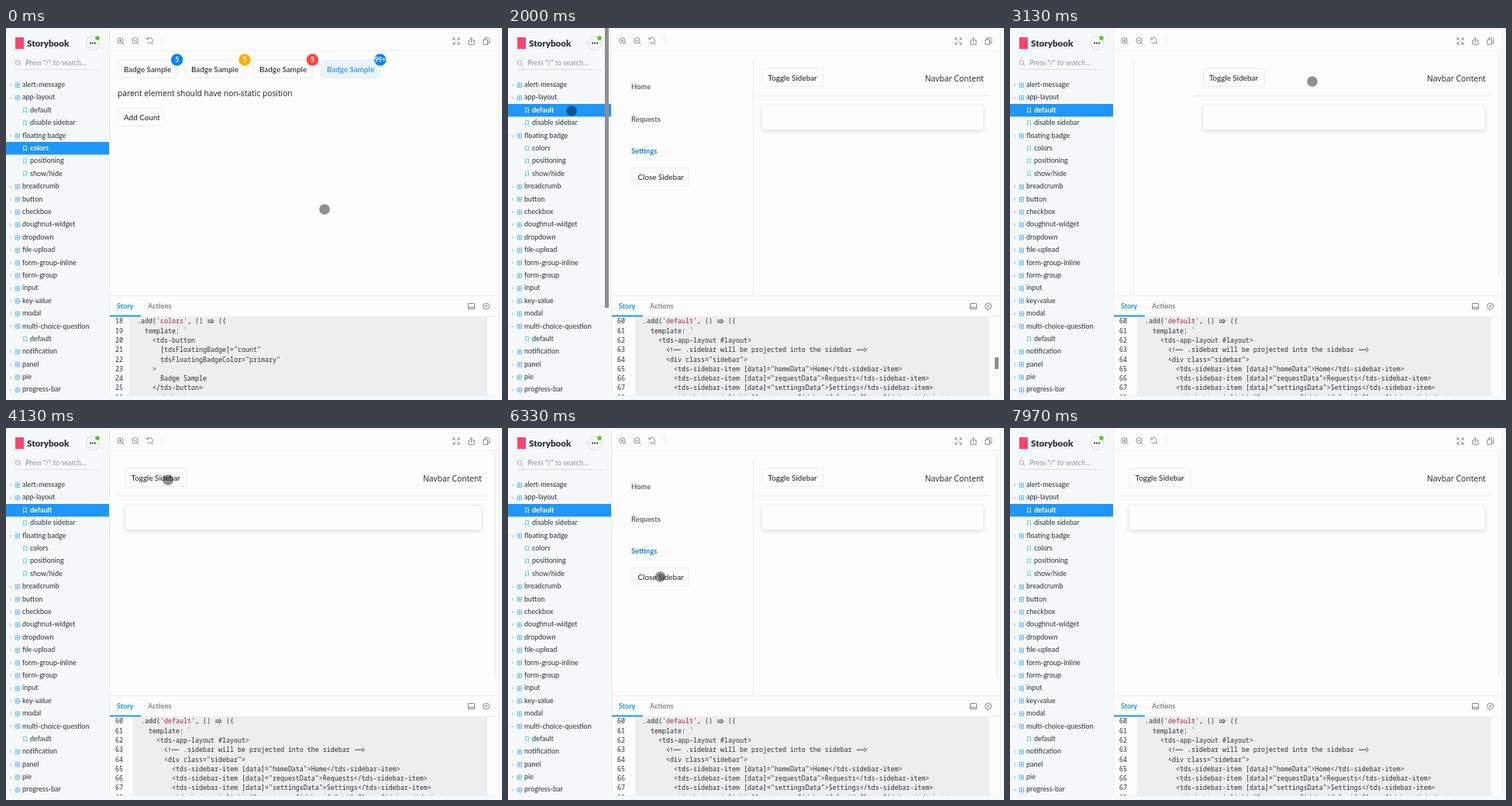
An HTML page with a canvas that plays this animation: 640x480 px, repeating every 8.01 s.

```html
<!DOCTYPE html>
<html lang="en">
<head>
<meta charset="utf-8">
<title>Component stories</title>
<style>
html, body { margin: 0; width: 100%; height: 100%; overflow: hidden; background: #f6f9fc; }
canvas { display: block; width: 640px; height: 480px; }
</style>
</head>
<body>
<canvas id="stage" width="640" height="480"></canvas>
<script>
const ctx = document.getElementById('stage').getContext('2d');
const LOOP = 8010;
const UI = 'Lato, sans-serif', BODY = '"Open Sans", sans-serif', MONO = '"Noto Sans Mono", monospace';
const INK = '#2e2e2e', GREY = '#7c7c7c', BLUE = '#1e96fa', LINE = '#ededed', PAPER = '#fdfdfd', SIDE = '#f6f9fc';
const THUMB = '#8f8f8f';

// Moments of the story, in ms
const PICK = 1500, CLOSE_1 = 3050, OPEN = 4270, CLOSE_2 = 6430, SLIDE = 300, FADE = 2550;

const MENU = ['alert-message', '-app-layout', '>default', '>disable sidebar', '-floating badge',
  '>colors', '>positioning', '>show/hide', 'breadcrumb', 'button', 'checkbox', 'doughnut-widget',
  'dropdown', 'file-upload', 'form-group-inline', 'form-group', 'input', 'key-value', 'modal',
  '-multi-choice-question', '>default', 'notification', 'panel', 'pie', '-progress-bar'];

const COLORS_CODE = { first: 18, x: 159, lines: [
  "  .add('colors', () => ({", '    template: `', '      <tds-button',
  '        [tdsFloatingBadge]="count"', '        tdsFloatingBadgeColor="primary"', '      >',
  '        Badge Sample', '      </tds-button>', '      <tds-button'] };
const LAYOUT_CODE = { first: 60, x: 164, lines: [
  "  .add('default', () => ({", '    template: `', '      <tds-app-layout #layout>',
  '        <!-- .sidebar will be projected into the sidebar -->', '        <div class="sidebar">',
  '          <tds-sidebar-item [data]="homeData">Home</tds-sidebar-item>',
  '          <tds-sidebar-item [data]="requestData">Requests</tds-sidebar-item>',
  '          <tds-sidebar-item [data]="settingsData">Settings</tds-sidebar-item>',
  '          <tds-button (click)="layout.openSidebar(false)">Close Sidebar</tds-button>'] };

// Pointer path: time, x, y
const PATH = [[0, 411, 234], [400, 440, 228], [1350, 82, 107], [2080, 82, 107], [2850, 390, 69],
  [3350, 390, 69], [4000, 209, 67], [5650, 209, 67], [6250, 196.5, 192], [7480, 196.5, 192], [7930, 502, -12]];

const clamp = v => Math.max(0, Math.min(1, v));
const smooth = p => p * p * (3 - 2 * p);

// CSS "ease": cubic-bezier(.25, .1, .25, 1)
function ease(p) {
  if (p <= 0 || p >= 1) return clamp(p);
  let lo = 0, hi = 1, u = 0.5;
  for (let i = 0; i < 18; i++) {
    u = (lo + hi) / 2;
    const x = 0.75 * u * (1 - u) + u ** 3;
    if (x < p) lo = u; else hi = u;
  }
  return 0.3 * u * (1 - u) ** 2 + 3 * u * u * (1 - u) + u ** 3;
}

function box(x, y, w, h, color) { ctx.fillStyle = color; ctx.fillRect(x, y, w, h); }

function text(s, x, y, font, color = INK, align = 'left') {
  ctx.font = font;
  ctx.fillStyle = color;
  ctx.textAlign = align;
  ctx.fillText(s, x, y);
}

function dot(x, y, r, color) {
  ctx.fillStyle = color;
  ctx.beginPath();
  ctx.arc(x, y, r, 0, 7);
  ctx.fill();
}

function ring(x, y, r, color, width = 1) {
  ctx.strokeStyle = color;
  ctx.lineWidth = width;
  ctx.beginPath();
  ctx.arc(x, y, r, 0, 7);
  ctx.stroke();
}

function draw(path, color, width = 1, x = 0, y = 0) {
  ctx.save();
  ctx.translate(x, y);
  ctx.strokeStyle = color;
  ctx.lineWidth = width;
  ctx.stroke(new Path2D(path));
  ctx.restore();
}

function frame(x, y, w, h, r, fill) {
  ctx.beginPath();
  ctx.roundRect(x + 0.5, y + 0.5, w - 1, h - 1, r);
  ctx.fillStyle = fill;
  ctx.fill();
  ctx.strokeStyle = LINE;
  ctx.lineWidth = 1;
  ctx.stroke();
}

function scrollbar(x, y, h, alpha) {
  ctx.globalAlpha = alpha;
  box(x, y, 5, h, THUMB);
  ctx.globalAlpha = 1;
}

function button(label, x, y, w, color = INK, fill = PAPER) {
  frame(x, y, w, 24, 3, fill);
  text(label, x + 8, y + 15.5, '500 9.9px ' + UI, color);
}

function menu(selected, thumb) {
  box(0, 0, 134, 480, SIDE);
  box(12, 12, 11, 15, '#fb4470');
  text('Storybook', 27, 24, '900 11.6px ' + UI);
  ring(112, 19.5, 8.7, '#dcdfe2');
  for (let i = -1; i < 2; i++) dot(112 + i * 3, 19.5, 1.1, INK);
  dot(118, 13, 2.8, '#66bf20');
  ring(15, 44.5, 2.7, '#a0a0a0', 0.9);
  draw('M2 2L4.5 4.5', '#a0a0a0', 0.9, 15, 44.5);
  text('Press "/" to search...', 25, 48.3, '9px ' + UI, '#929292');
  box(12, 53, 109, 1, '#dde0dc');

  MENU.forEach((item, i) => {
    const y = 73 + i * 16.39, child = item[0] === '>', on = i === selected;
    const label = item.replace(/^[->]/, '');
    if (on) box(0, Math.round(y - 8.2), 133, 16.4, BLUE);
    if (child) {
      draw('M-2 -3H2V3L0 1L-2 3Z', on ? '#fff' : '#45d0c8', 0.8, 24.5, y + 0.5);
    } else {
      const mark = item[0] === '-' ? 'M-1.5 -.7L0 .8L1.5 -.7' : 'M-.7 -1.5L.8 0L-.7 1.5';
      draw(mark, '#a0a0a0', 0.9, 6, y + 0.6);
      draw('M-2.7 -2.7H2.7V2.7H-2.7ZM0 -2.7V2.7M-2.7 0H2.7', '#58aef0', 0.8, 14.8, y + 0.7);
    }
    text(label, child ? 31 : 21, y + 3.1, (on ? '700 ' : '') + '9px ' + UI, on ? '#fff' : INK);
  });
  scrollbar(125, 0, 361, thumb);
}

function magnifier(x, inner) {
  ring(x, 16.2, 3.6, GREY, 0.9);
  draw('M2.7 2.7L5.2 5.2' + inner, GREY, 0.9, x, 16.2);
}

function chrome() {
  frame(133, 1, 503, 474, 3, PAPER);
  magnifier(147.5, 'M-1.8 0H1.8M0 -1.8V1.8');
  magnifier(166.5, 'M-1.8 0H1.8');
  draw('M-3.4 1.4A3.7 3.7 0 1 0 -2.8 -2.5M-3.6 -4V-1.6H-1.2M2.7 2.7L5.2 5.2', GREY, 0.9, 185.5, 16.2);
  box(201, 11, 1, 11, LINE);
  draw('M-4 -1.5V-4H-1.5M1.5 -4H4V-1.5M4 1.5V4H1.5M-1.5 4H-4V1.5M-4 -4L-1 -1M4 -4L1 -1M4 4L1 1M-4 4L-1 1',
    GREY, 0.9, 581, 17);
  draw('M-1.5 -1H-3.6V4.2H3.6V-1H1.5M0 2V-4.2M-2 -2.3L0 -4.3L2 -2.3', GREY, 0.9, 600.5, 17);
  draw('M-4 -2H1.5V4.3H-4ZM-2 -2V-4.3H2.3L4 -2.6V2.2H1.5', GREY, 0.9, 620, 17);
  box(134, 29, 501, 1, LINE);
}

function badges() {
  const tints = ['#0b84ee', '#fdb10b', '#fb4645', '#0b84ee'];
  tints.forEach((tint, i) => {
    const x = 144 + i * 87.4, last = i === 3;
    button('Badge Sample', Math.round(x), 41, 77, last ? '#1890ea' : INK, last ? '#eaf4fd' : PAPER);
    dot(x + 76.6, 41, 7.7, tint);
    text(last ? '99+' : '5', x + 76.6, 44, '700 8.5px ' + UI, '#fff', 'center');
  });
  text('parent element should have non-static position', 144, 88, '10.25px ' + BODY, '#222');
  button('Add Count', 144, 103, 60);
}

// The sidebar shrinks and shifts at once, so it travels twice as far as the content
function layout(closed, marked) {
  const sx = 348 * closed, mx = 317 - 174 * closed;
  if (sx < 190) {
    const bold = '700 9.3px ' + UI;
    box(316 - sx, 42, 1, 303, LINE);
    text('Home', 159 - sx, 79, bold, '#666');
    text('Requests', 159 - sx, 120.7, bold, '#666');
    text('Settings', 159 - sx, 162, bold, '#1580c8');
    button('Close Sidebar', 159.5 - sx, 180, 74);
  }
  box(mx, 87, 620 - mx, 1, LINE);
  button('Toggle Sidebar', mx + 10.5, 52, 80);
  text('Navbar Content', 614, 68.5, '10.3px ' + BODY, '#222', 'right');
  ctx.save();
  ctx.shadowColor = 'rgba(0, 0, 0, .1)';
  ctx.shadowBlur = 4;
  ctx.shadowOffsetY = 2;
  frame(mx + 10, 99, 604 - mx, 33, 4, PAPER);
  ctx.restore();
  frame(mx + 10, 99, 604 - mx, 33, 4, PAPER);
  if (marked) box(630.5, 33, 1, 288, '#e4e4e4');
}

// Code with the joined arrows of a ligature font
function codeLine(s, x, y) {
  const font = '8.33px ' + MONO, cell = 5;
  const plain = s.replace(/=> |<!--|-->/g, m => ' '.repeat(m.length));
  const quoted = /'\w+'/.exec(plain);
  if (quoted) {
    const end = quoted.index + quoted[0].length;
    text(plain.slice(0, quoted.index), x, y, font);
    text(quoted[0], x + quoted.index * cell, y, font, '#a8223a');
    text(plain.slice(end), x + end * cell, y, font);
  } else text(plain, x, y, font);
  const mark = (token, path) => {
    const at = s.indexOf(token);
    if (at >= 0) draw(path, INK, 0.9, x + at * cell, y - 3);
  };
  mark('=> ', 'M1 -1.2H7.5M1 1.2H7.5M6 -2.8L9 0L6 2.8');
  mark('<!--', 'M4 -2.5L1 0L4 2.5M7 -3V.8M7 2V3M9.5 0H19');
  mark('-->', 'M1 0H11M10.5 -2.5L13.5 0L10.5 2.5');
}

function addons(code, thumb) {
  box(134, 345, 501, 129, PAPER);
  box(134, 345, 501, 1, LINE);
  text('Story', 143, 361.6, '700 9px ' + UI, '#1492f0');
  text('Actions', 183, 361.6, '700 9px ' + UI, '#858585');
  draw('M-4 -3.5H4V3.5H-4ZM-4 1.5H4', GREY, 0.9, 600.5, 359);
  ring(619.7, 359, 4, GREY, 0.9);
  draw('M-1.6 -1.6L1.6 1.6M1.6 -1.6L-1.6 1.6', GREY, 0.9, 619.7, 359);
  box(134, 372, 501, 1, LINE);
  box(134, 370.5, 40, 2, BLUE);

  ctx.save();
  ctx.beginPath();
  ctx.rect(134, 373, 501, 101);
  ctx.clip();
  box(code.x, 373, 621 - code.x, 101, '#eeeeee');
  code.lines.forEach((line, i) => {
    const y = 381.3 + i * 12.3;
    text(code.first + i, 141, y, '8.33px ' + MONO);
    codeLine(line, code.x, y);
  });
  ctx.restore();
  scrollbar(628, 425, 15, thumb);
}

function pointer(t) {
  const next = PATH.findIndex(p => p[0] > t);
  if (next < 0) return;
  const [t0, x0, y0] = PATH[next - 1], [t1, x1, y1] = PATH[next];
  const p = smooth((t - t0) / (t1 - t0));
  dot(x0 + (x1 - x0) * p, y0 + (y1 - y0) * p, 6.8, 'rgba(0, 0, 0, .44)');
}

// 0 = sidebar open, 1 = closed
function closing(t) {
  if (t >= CLOSE_2) return ease((t - CLOSE_2) / SLIDE);
  if (t >= OPEN) return 1 - ease((t - OPEN) / SLIDE);
  return ease((t - CLOSE_1) / SLIDE);
}

function render(now) {
  const t = now % LOOP, picked = t >= PICK;
  const thumb = picked ? clamp(1 - (t - FADE) / 250) : 0;
  box(0, 0, 640, 480, SIDE);
  chrome();
  if (picked) layout(closing(t), t >= CLOSE_1);
  else badges();
  addons(picked ? LAYOUT_CODE : COLORS_CODE, thumb);
  menu(picked ? 2 : 5, thumb);
  box(133, 3, 1, 470, LINE);
  pointer(t);
}

const start = performance.now();
function tick() {
  render(performance.now() - start);
  requestAnimationFrame(tick);
}
tick();
</script>
</body>
</html>
```
